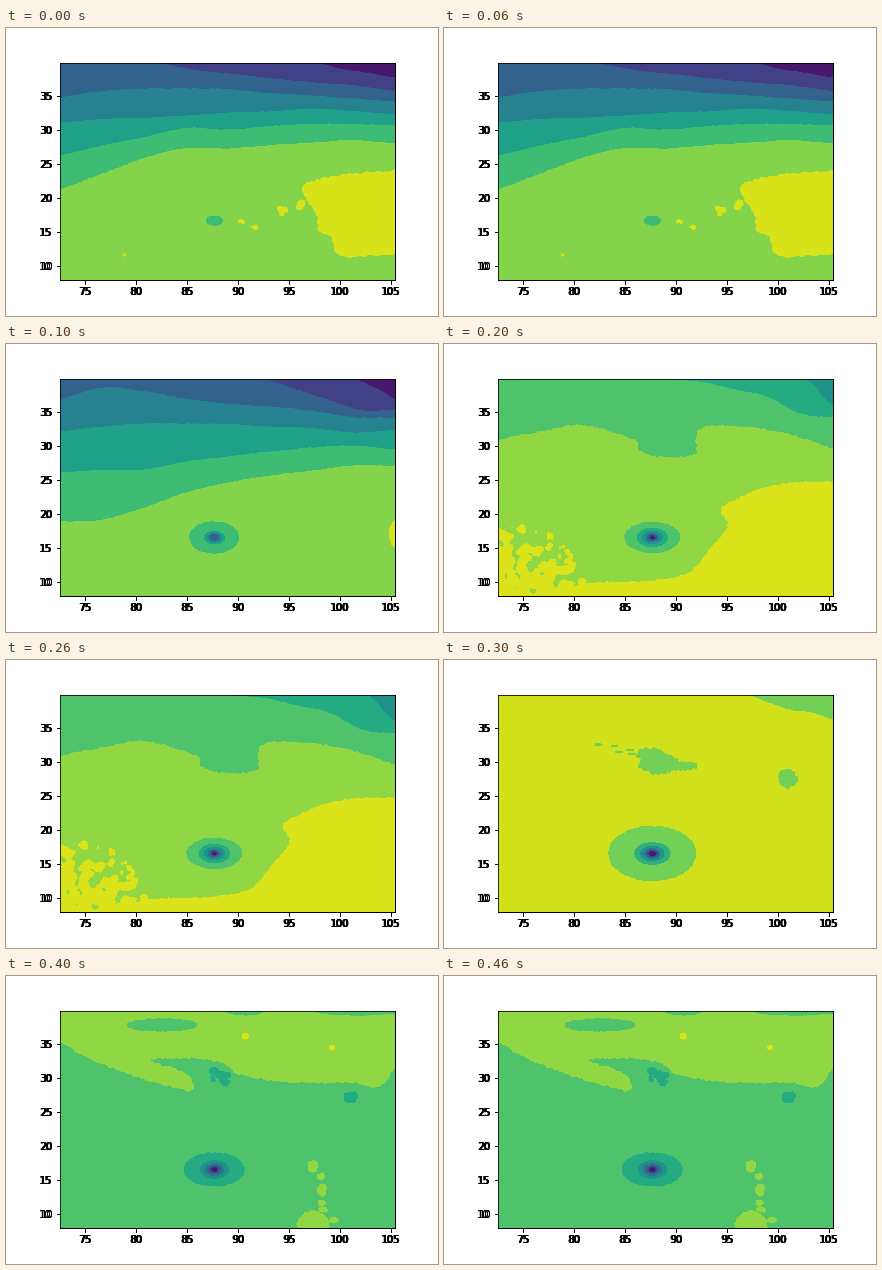
A matplotlib script that plays this animation: 432x288 px, repeating every 0.5 s.

```python
import numpy as np
import matplotlib.pyplot as plt
from matplotlib.animation import FuncAnimation
from matplotlib.patches import Polygon
from matplotlib.transforms import Affine2D

W, H, DPI = 432, 288, 72
LEFT, RIGHT, TOP, BOTTOM = 54, 388.8, 34.56, 252
EYE = np.array([208.3, 193.5])
rng = np.random.default_rng(4)


def smooth(pts, n=12):
    """Cubic curve through a few key points."""
    p = np.array(pts, float)
    m = np.gradient(p, axis=0)
    t = np.linspace(0, 1, n, endpoint=False)[:, None]
    parts = [(1 + 2 * t) * (1 - t) ** 2 * p[i] + t * (1 - t) ** 2 * m[i]
             + t * t * (3 - 2 * t) * p[i + 1] + t * t * (t - 1) * m[i + 1]
             for i in range(len(p) - 1)]
    return np.vstack(parts + [p[-1:]])


def roughen(line, rough, step=2.0):
    """Resample a line evenly and jitter it like gridded contour data."""
    dist = np.r_[0, np.cumsum(np.hypot(*np.diff(line, axis=0).T))]
    s = np.linspace(0, dist[-1], max(int(dist[-1] / step), 3))
    out = np.c_[np.interp(s, dist, line[:, 0]), np.interp(s, dist, line[:, 1])]
    out[1:-1] += rng.uniform(-rough, rough, (len(s) - 2, 2))
    return out


def noise(rows, cols, passes=2):
    """Smoothed random field with unit spread."""
    z = rng.normal(size=(rows, cols))
    box = np.ones(3) / 3
    for axis in [0, 1] * passes:
        z = np.apply_along_axis(np.convolve, axis, z, box, "same")
    return z / z.std()


class Scene:
    """Filled contour map with a given number of colour bands."""

    def __init__(self, bands, base):
        self.bands = bands
        self.parts = []
        self.add([(0, 0), (W, 0), (W, H), (0, H)], base)

    def color(self, band):
        return plt.cm.viridis((band + 0.5) / self.bands)

    def add(self, pts, band):
        patch = Polygon(pts, closed=True, fc=self.color(band), ec="none", lw=0,
                        antialiased=False)
        self.parts.append(ax.add_patch(patch))

    def above(self, band, pts, rough=0.4):
        line = roughen(smooth(pts), rough)
        self.add(np.r_[line, [(line[-1, 0], 20), (line[0, 0], 20)]], band)

    def edge(self, band, heights, x0=LEFT, rough=0.4):
        """Fill above a curve with evenly spaced heights up to the right side."""
        x = np.linspace(x0, 389, len(heights))
        self.above(band, np.c_[x, heights], rough)

    def area(self, band, pts, rough=0.8):
        self.add(roughen(smooth(pts), rough), band)

    def spot(self, band, x, y, w, h, rough=0.5):
        a = np.linspace(0, 2 * np.pi, 40)
        ring = np.c_[x + w / 2 * np.cos(a), y + h / 2 * np.sin(a)]
        self.add(roughen(ring, rough), band)

    def scatter(self, band, n, x, y, w, h, size):
        for dx, dy, k in rng.uniform(-0.5, 0.5, (n, 3)):
            d = size * (1 + k)
            self.spot(band, x + w * dx, y + h * dy, d * 1.3, d, 0.8)

    def patchy(self, band, x0, x1, y0, y1):
        """Ragged islands that thin out towards the upper right."""
        x, y = np.meshgrid(np.arange(x0, x1, 2), np.arange(y0, y1, 1.7))
        u, v = (x - x0) / (x1 - x0), (y - y0) / (y1 - y0)
        z = noise(*x.shape) + 2.6 * v - 3.2 * u * (1 - 0.5 * v) - 0.2
        self.parts.append(ax.contourf(x, y, z, levels=[0, 99], antialiased=False,
                                      colors=[self.color(band)]))

    def cyclone(self, band, w, h, inner, rings):
        self.spot(band, *EYE, w, h, 0.6)
        for k in range(rings):
            d = inner * 0.66 ** k
            self.spot(band - 1 - k, *EYE, d, d * 0.62, 0.2)


def high_level():
    s = Scene(8, 6)
    s.edge(5, [161, 145, 129.5, 119.5, 120, 116.5, 114, 111.5, 115])
    s.edge(4, [127, 117, 108.5, 99.5, 101, 97.5, 95.5, 95.5, 97])
    s.edge(3, [94, 90.5, 89, 87, 84, 83, 80, 82.5, 86])
    s.edge(2, [69, 62.5, 60, 60, 60.5, 64.5, 67, 70, 73])
    s.edge(1, [35, 42, 46, 50.5, 54, 57, 63], 155)
    s.edge(0, [35, 41, 44.5, 49], 315)
    s.area(7, [(392, 143), (345, 146), (308, 153), (297, 162), (311, 188),
               (314, 203), (326, 209), (333, 226), (360, 228), (392, 225)], 1.1)
    s.spot(5, *EYE - (0, 1), 16, 9, 0.3)
    s.spot(7, 118.5, 227, 3, 2.5)
    s.spot(7, 235, 193.5, 7, 3)
    s.scatter(7, 2, 248.5, 199, 2, 6, 3)
    s.scatter(7, 4, 277, 183, 8, 6, 4)
    s.scatter(7, 2, 295, 177, 3, 5, 4)
    return s


def upper_level():
    s = Scene(8, 6)
    s.edge(5, [177, 175, 163, 148, 138, 131, 126, 121, 121])
    s.edge(4, [128, 125.5, 125, 117, 112, 107, 103, 101, 105])
    s.edge(3, [87, 82, 79, 79, 79.5, 82, 83.5, 88, 85])
    s.edge(2, [55, 43, 46.5, 54, 59, 62, 66, 72.5, 73])
    s.edge(1, [35, 46, 56, 66, 65], 262)
    s.edge(0, [35, 41, 46.5, 55], 352)
    s.spot(7, 392, 190, 17, 28)
    s.cyclone(5, 49, 31, 20, 3)
    return s


def middle_level():
    s = Scene(9, 7)
    s.above(6, [(54, 95), (95, 87), (135, 80), (176, 90), (194, 97), (196, 106),
                (215, 112), (250, 110), (251, 92), (262, 82), (310, 83),
                (350, 91), (389, 104)], 0.9)
    s.edge(5, [35, 38, 45, 52.5, 69, 73], 228)
    s.edge(4, [35, 41.5, 53, 61], 362)
    s.area(8, [(392, 138), (350, 139), (318, 145), (290, 157), (277, 166),
               (284, 182), (266, 206), (245, 229), (210, 237), (138, 241),
               (132, 258), (392, 258)], 0.9)
    s.patchy(8, 52, 144, 180, 256)
    s.cyclone(6, 55, 30, 30, 6)
    return s


def lower_level():
    s = Scene(7, 6)
    s.edge(5, [35, 43, 49.5, 52, 59], 307)
    s.spot(5, 207, 95, 28, 14, 1.6)
    s.spot(5, 215, 104, 40, 18, 1.6)
    s.spot(5, 238, 106, 30, 7, 1.2)
    s.spot(5, 344, 119, 18, 17, 1.8)
    for x, y in [(155, 84.5), (170, 86), (175, 92), (188, 94), (186, 90)]:
        s.spot(5, x, y, 8, 1.8, 0.4)
    s.cyclone(5, 87, 54, 35, 5)
    return s


def surface_level():
    s = Scene(9, 6)
    s.above(7, [(54, 65), (85, 83), (130, 100), (165, 110), (186, 114), (180, 98),
                (143, 84), (190, 82), (220, 88), (235, 98), (285, 106),
                (345, 106), (372, 111), (389, 92)], 1.1)
    s.spot(6, 156, 49, 70, 12)
    s.spot(6, 239, 35, 36, 8, 0.3)
    s.spot(6, 352, 35, 84, 8, 0.3)
    s.spot(8, 239.5, 60, 6, 6)
    s.spot(8, 307, 65.5, 3, 2)
    s.spot(8, 326, 71.5, 6, 4)
    s.scatter(5, 9, 214, 101, 20, 12, 5)
    s.scatter(5, 5, 347, 122, 13, 6, 5)
    s.spot(7, 307, 251, 32, 32, 0.8)
    s.spot(7, 307, 190.5, 9, 12, 0.8)
    s.spot(7, 316, 214, 8, 13, 0.8)
    s.scatter(7, 5, 317, 216, 5, 38, 5)
    s.spot(7, 328, 244, 9, 5, 0.8)
    s.cyclone(5, 60, 33, 28, 5)
    return s


plt.rcParams["font.family"] = "DejaVu Sans"
plt.rcParams["font.size"] = 10
fig = plt.figure(figsize=(W / DPI, H / DPI), dpi=DPI, facecolor="white")


def make_axes(nudge=0):
    a = fig.add_axes([0.125, 0.125, 0.775, 0.755])
    a.set_xticks([79.3 + 51 * i for i in range(7)], range(75, 106, 5))
    a.set_yticks([238.4 - 34 * i for i in range(6)], range(10, 36, 5))
    a.set_xlim(LEFT, RIGHT)
    a.set_ylim(BOTTOM, TOP)
    a.set_autoscale_on(False)
    for label in a.get_xticklabels() + a.get_yticklabels():
        label.set_transform(label.get_transform() + Affine2D().translate(nudge, 0))
    return a


# Stacked copies give the tick labels their heavy look; the map lies on top.
for nudge in (-1, 0, -1, 0):
    make_axes(nudge)
ax = make_axes()

scenes = [high_level(), upper_level(), middle_level(), lower_level(),
          surface_level()]


def update(i):
    for k, scene in enumerate(scenes):
        for part in scene.parts:
            part.set_visible(k == i)
    return []


anim = FuncAnimation(fig, update, frames=len(scenes), interval=100,
                     repeat=True, repeat_delay=0)
plt.show()
```
